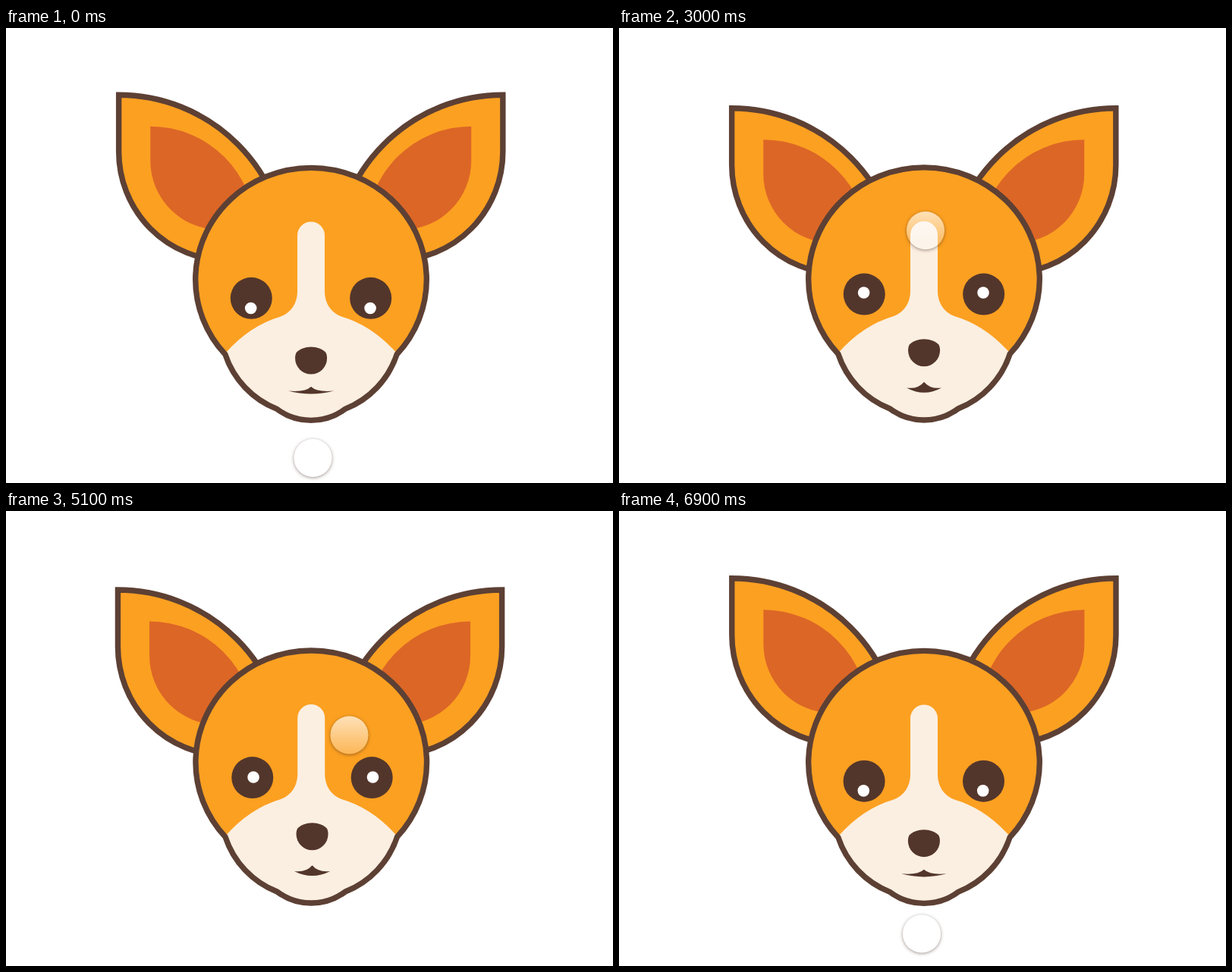
An HTML page that plays this animation: 800 by 600 pixels, repeating every 7 s.

```html
<!DOCTYPE html>
<html lang="en">
<head>
<meta charset="utf-8">
<title>Dog following a knob</title>
<style>
  html, body { margin: 0; width: 100%; height: 100%; overflow: hidden; background: #fff; }
  #stage { position: relative; width: 800px; height: 600px; overflow: hidden; background: #fff; }
  svg { display: block; }
  .line { stroke: #5d4034; stroke-width: 7.4; }
  .fur { fill: #fca021; }
  .inner { fill: #dc6626; }
  .cream { fill: #fbefe1; }
  .dark { fill: #53362b; }
  #knob {
    position: absolute; left: -24.7px; top: -24.7px; width: 49.4px; height: 49.4px;
    border-radius: 50%;
    background: linear-gradient(rgba(255, 255, 255, .68), rgba(255, 255, 255, .24));
    box-shadow: 0 1px 4px rgba(60, 35, 25, .5);
  }
</style>
</head>
<body>
<div id="stage">
  <svg width="800" height="600" viewBox="0 0 800 600">
    <defs>
      <g id="ear">
        <path class="line fur" d="M148.7 88.2V163a141.3 143.2 0 0 0 141.3 143.2H370.2V309.7A221.5 221.5 0 0 0 148.7 88.2Z"/>
        <path class="inner" d="M190.3 129.7V175a91 91 0 0 0 91 91H328.3V267.7A138 138 0 0 0 190.3 129.7Z"/>
      </g>
      <path id="skull" d="M288.8 429.8A152.3 147.3 0 1 1 515.2 429.8A117 117 0 0 1 447 502A75 75 0 0 1 357 502A117 117 0 0 1 288.8 429.8Z"/>
      <clipPath id="face"><use href="#skull"/></clipPath>
    </defs>
    <g id="ears">
      <use href="#ear"/>
      <use href="#ear" transform="translate(803.6 0) scale(-1 1)"/>
    </g>
    <g id="head">
      <use href="#skull" class="fur"/>
      <path class="cream" clip-path="url(#face)" d="M289 428.5Q321 392 362 380C376 375 384 362 384 347V273a18 18 0 0 1 36 0V347C420 362 428 375 442 380Q483 392 515 428.5V530H289Z"/>
      <use href="#skull" class="line" fill="none"/>
    </g>
    <g id="eyes" class="dark"><circle r="27.5"/><circle cx="157.4" r="27.5"/></g>
    <g id="glints" fill="#fff"><circle r="7.8"/><circle cx="157.4" r="7.8"/></g>
    <path id="nose" class="dark" d="M0 0C8 0 15 3 19 7Q21 9.5 21 15A21 21 0 0 1 -21 15Q-21 9.5 -19 7C-15 3 -8 0 0 0Z"/>
    <path id="mouth" class="dark"/>
  </svg>
  <div id="knob"></div>
</div>
<script>
const LOOP = 7000, STEP = 100;
const parts = Object.fromEntries(
  ['ears', 'head', 'eyes', 'glints', 'nose', 'mouth', 'knob']
    .map(id => [id, document.getElementById(id)]));

// Turning points of the drag: time, x, y
const stops = [
  [0, 404.5, 567], [300, 404.5, 567], [1100, 396, 113.5], [1600, 395.5, 98],
  [1800, 395.5, 98], [2200, 163, 194.5], [2600, 152, 284], [3400, 656, 250],
  [3600, 656, 250], [4100, 480, 331.5], [4500, 160, 475], [5100, 452.5, 295.5],
  [5700, 615.5, 276.5], [6000, 530, 537], [6600, 399, 557.5], [LOOP, 399, 557.5]
];

const slope = (i, axis) =>
  (stops[i + 1][axis] - stops[i][axis]) / (stops[i + 1][0] - stops[i][0]);

// Speed at a stop: zero where the direction turns, else the harmonic mean
function speed(i, axis) {
  if (i === 0 || i === stops.length - 1) return 0;
  const a = slope(i - 1, axis), b = slope(i, axis);
  return a * b > 0 ? 2 * a * b / (a + b) : 0;
}

// Smooth Hermite curve that never overshoots a stop
function dragAt(t, axis) {
  const i = stops.findIndex(s => s[0] > t) - 1;
  const p = stops[i], q = stops[i + 1];
  const span = q[0] - p[0], k = (t - p[0]) / span, r = 1 - k;
  return p[axis] * r * r * (1 + 2 * k) + q[axis] * k * k * (3 - 2 * k) +
    span * k * r * (speed(i, axis) * r - speed(i + 1, axis) * k);
}

function move(node, x, y) {
  node.setAttribute('transform', `translate(${x.toFixed(2)} ${y.toFixed(2)})`);
}

// The smile widens as the knob goes down
function mouthPath(cx, y) {
  const k = (y - 113.5) / 453.5;
  const w = 19.5 + 10.5 * k, corner = 472.5 + 6 * k;
  const peak = 463.5 + 9.5 * k, low = 2 * (480 + 2.5 * k) - corner;
  return `M${cx - w} ${corner}Q${cx - 8} ${corner + 2} ${cx} ${peak}` +
    `Q${cx + 8} ${corner + 2} ${cx + w} ${corner}Q${cx} ${low} ${cx - w} ${corner}Z`;
}

function draw(t) {
  const x = dragAt(t, 1), y = dragAt(t, 2);
  const u = x - 402, v = y - 300;
  move(parts.ears, -.025 * u, -.0584 * (v - 267));
  move(parts.head, .005 * u, .0015 * v);
  move(parts.eyes, 323.2 + .031 * u, 351.65 + .0175 * v);
  move(parts.glints, 322.5 + .0704 * u, 351.25 + .0684 * v);
  move(parts.nose, 402 + .031 * u, 411.4 + .0342 * v);
  parts.mouth.setAttribute('d', mouthPath(402 + .031 * u, y));
  parts.knob.style.transform = `translate(${x}px, ${y}px)`;
}

const start = performance.now();
function tick(now) {
  const t = Math.max(0, now - start) % LOOP;
  draw(Math.floor(t / STEP) * STEP);
  requestAnimationFrame(tick);
}
draw(0);
requestAnimationFrame(tick);
</script>
</body>
</html>
```
